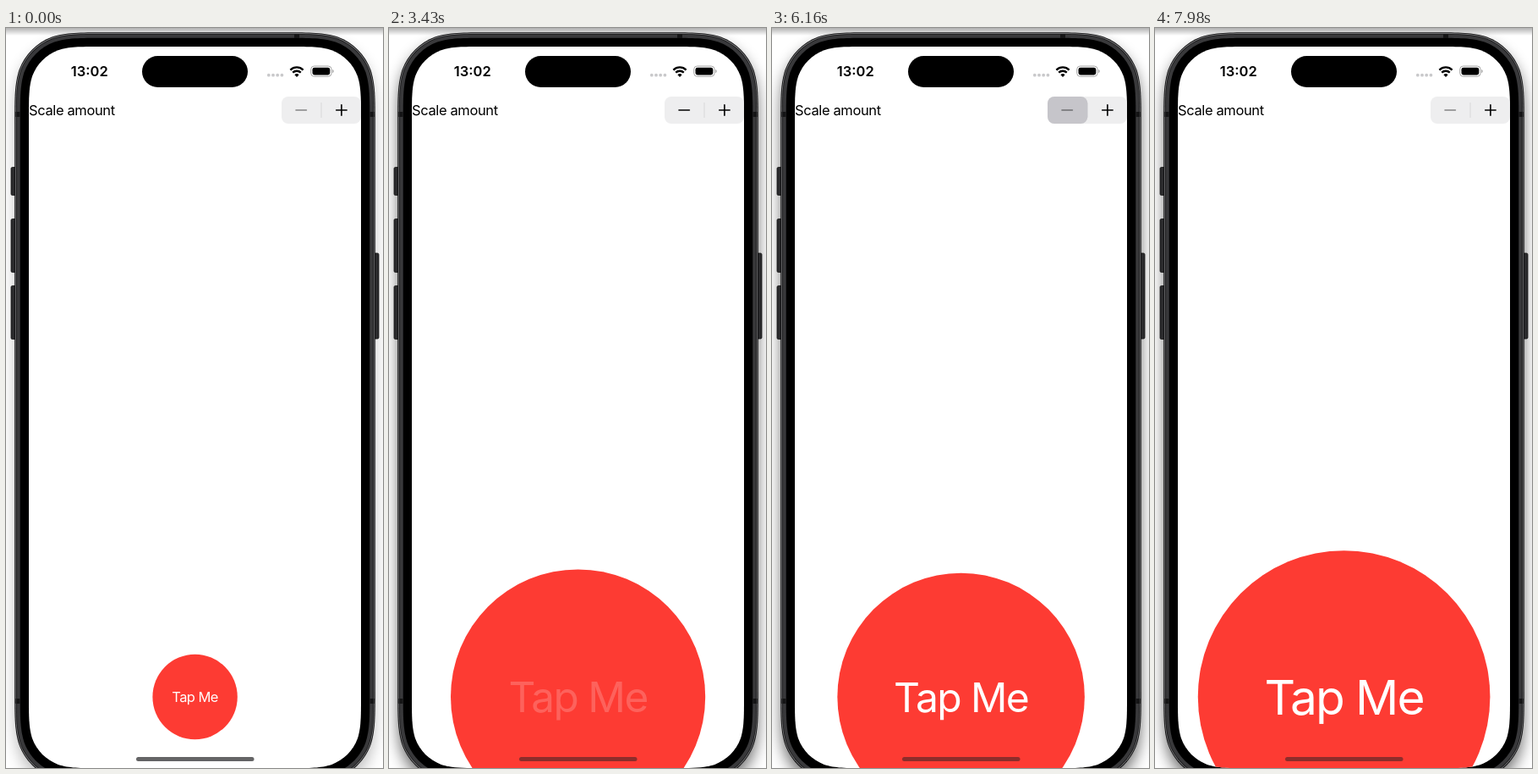
An HTML page that plays this animation: 446 px wide and 874 px high, repeating every 8 s.

```html
<!DOCTYPE html>
<html lang="en">
<head>
<meta charset="utf-8">
<title>Scale amount</title>
<style>
  html, body { margin: 0; width: 100%; height: 100%; overflow: hidden; background: #fff; }
  svg { display: block; width: 100%; height: 100%; }
  text { font: 400 16.5px Inter, "Open Sans", sans-serif; letter-spacing: -.37px; }
  #shadow { filter: blur(9px); }
  .icon { fill: none; stroke: #000; stroke-width: 1.6; stroke-linecap: round; }
</style>
</head>
<body>
<svg viewBox="0 0 446 874">
  <defs>
    <linearGradient id="topShade" x2="0" y2="1">
      <stop offset="0" stop-opacity=".3"/>
      <stop offset="1" stop-opacity="0"/>
    </linearGradient>
    <clipPath id="screenClip"><path id="clipShape"/></clipPath>
  </defs>

  <path id="shadow" transform="translate(0 10)"/>
  <rect width="446" height="9" fill="url(#topShade)"/>
  <g fill="#2b2b2d" stroke="#111" stroke-width=".8">
    <rect x="6" y="164.500" width="7" height="33" rx="1.5"/>
    <rect x="6" y="225.500" width="7" height="63" rx="1.5"/>
    <rect x="6" y="304.500" width="7" height="63" rx="1.5"/>
    <rect x="434" y="266" width="7" height="101" rx="1.5"/>
  </g>
  <g id="body"></g>
  <g fill="#151516">
    <rect x="11.500" y="99" width="5" height="6"/><rect x="430.500" y="99" width="5" height="6"/>
    <rect x="11.500" y="792" width="5" height="6"/><rect x="430.500" y="792" width="5" height="6"/>
    <rect x="341" y="7" width="6" height="5"/>
  </g>

  <g clip-path="url(#screenClip)">
    <rect x="27" y="22" width="393" height="852" fill="#fff"/>
    <text x="98.800" y="57.300" text-anchor="middle" style="font-weight:600;letter-spacing:0">13:02</text>
    <rect x="161" y="33" width="125" height="37" rx="18.500"/>
    <g fill="#c9c9cb">
      <circle cx="310.800" cy="55.700" r="1.900"/><circle cx="316" cy="55.700" r="1.900"/>
      <circle cx="321.200" cy="55.700" r="1.900"/><circle cx="326.400" cy="55.700" r="1.900"/>
    </g>
    <g fill="none" stroke="#000" stroke-width="2.300">
      <path d="M336.400 49.600a10.800 10.800 0 0 1 15.200 0"/>
      <path d="M339.200 52.700a6.900 6.900 0 0 1 9.600 0"/>
    </g>
    <path d="M344 58l-2.600-2.700a3.700 3.700 0 0 1 5.200 0z"/>
    <rect x="360.700" y="45" width="24.400" height="12.200" rx="3.900" fill="none" stroke="#a6a6a6"/>
    <rect x="362.500" y="46.800" width="20.800" height="8.600" rx="2.400"/>
    <path d="M386.300 49v4.200q1.500-.6 1.500-2.100t-1.500-2.100" fill="#a6a6a6"/>

    <text x="27" y="103.200">Scale amount</text>
    <rect x="326" y="81" width="94" height="32" rx="8" fill="#eeeeef"/>
    <rect x="372.500" y="88" width="1" height="18" fill="#d8d8da"/>
    <rect id="highlight" fill="#c6c5ca"/>
    <path id="minus" class="icon" d="M343 97h12.400"/>
    <path class="icon" d="M390.700 97h12.400M396.900 90.800v12.400"/>

    <g id="button">
      <circle r="50.200" fill="#fd3b33"/>
      <text id="label" x="0" y="6.100" text-anchor="middle" fill="#fff" style="letter-spacing:-.55px">Tap Me</text>
    </g>
    <rect id="homeBar" x="154" y="861" width="139.500" height="5" rx="2.500"/>
  </g>
</svg>
<script>
const LOOP = 8000, STEP = 70;
const TAPS = [840, 2100, 3430];      // touch-down times of the red button
const MINUS_PRESS = 5320, MINUS_RELEASE = 6180, DISABLED_AT = 6125;
const CORNER = [[1.528, 0], [1.088, 0], [.868, 0], [.631, .075], [.373, .169],
                [.169, .373], [.075, .631], [0, .868], [0, 1.088], [0, 1.528]];

const el = id => document.getElementById(id);
const set = (node, attrs) => {
  for (const name in attrs) node.setAttribute(name, attrs[name]);
};
const clamp = v => Math.min(1, Math.max(0, v));
const mix = (a, b, p) => a + (b - a) * p;
const progress = (t, start, duration) => clamp((t - start) / duration);

// cubic-bezier(.42, 0, .58, 1)
function easeInOut(p) {
  let low = 0, high = 1;
  for (let i = 0; i < 24; i++) {
    const u = (low + high) / 2, v = 1 - u;
    if (1.26 * u * v * v + 1.74 * u * u * v + u ** 3 < p) low = u; else high = u;
  }
  return low * low * (3 - 2 * low);
}

// Screen outline with continuous corners, grown outwards by `grow`.
function outline(grow) {
  const left = 27 - grow, top = 22 - grow, right = 420 + grow, bottom = 874 + grow;
  const r = 55 + grow * .9;
  const corners = [
    ([a, b]) => [right - a * r, top + b * r],
    ([a, b]) => [right - b * r, bottom - a * r],
    ([a, b]) => [left + a * r, bottom - b * r],
    ([a, b]) => [left + b * r, top + a * r]
  ];
  return corners.map((place, i) => {
    const [first, ...rest] = CORNER.map(place);
    return (i ? "L" : "M") + first + "C" + rest.join(" ");
  }).join("") + "Z";
}

for (const [grow, fill] of [[16.8, "#0d0d0e"], [15.9, "#737375"], [15, "#161617"], [14.2, "#39393b"], [10.3, "#000"]]) {
  const layer = document.createElementNS("http://www.w3.org/2000/svg", "path");
  set(layer, { d: outline(grow), fill });
  el("body").append(layer);
}
set(el("clipShape"), { d: outline(0) });
set(el("shadow"), { d: outline(16) });

function scaleAt(t) {
  if (t >= 7125) return 1 + 2.55 * easeInOut(progress(t, 7125, 1000));
  if (t >= 5465) return 4 - 3 * easeInOut(progress(t, 5465, 1660));
  return 1 + TAPS.filter(tap => t >= tap + STEP).length;
}

function labelOpacity(t) {
  const tap = TAPS.filter(start => t >= start).pop();
  return tap === undefined ? 1 : mix(.2, 1, easeInOut(progress(t, tap + STEP, 420)));
}

function draw(t) {
  const scale = scaleAt(t);
  set(el("shadow"), { opacity: t < 700 ? .27 : .58 });
  set(el("button"), { transform: `translate(223.6 790) scale(${scale})` });
  set(el("label"), { opacity: labelOpacity(t) });

  const overRed = clamp((scale - 1.4) / .6);
  set(el("homeBar"), { fill: `rgb(${mix(100, 141, overRed)},${mix(100, 45, overRed)},${mix(101, 43, overRed)})` });

  const disabled = t < TAPS[0] + STEP || t >= DISABLED_AT;
  set(el("minus"), { "stroke-opacity": disabled ? .45 : 1 });

  const grown = progress(t, MINUS_PRESS, 140);
  const inset = mix(2.6, 0, grown);
  const visible = t < MINUS_PRESS ? 0 : mix(.75, 1, grown) * (1 - progress(t, MINUS_RELEASE, 280));
  set(el("highlight"), {
    x: 326 + inset, y: 81 + inset, width: 47.3 - 2 * inset, height: 32 - 2 * inset,
    rx: 8 - inset / 2, opacity: visible
  });
}

function tick(now) {
  draw(Math.floor(now % LOOP / STEP) * STEP);
  requestAnimationFrame(tick);
}
draw(0);
requestAnimationFrame(tick);
</script>
</body>
</html>
```
